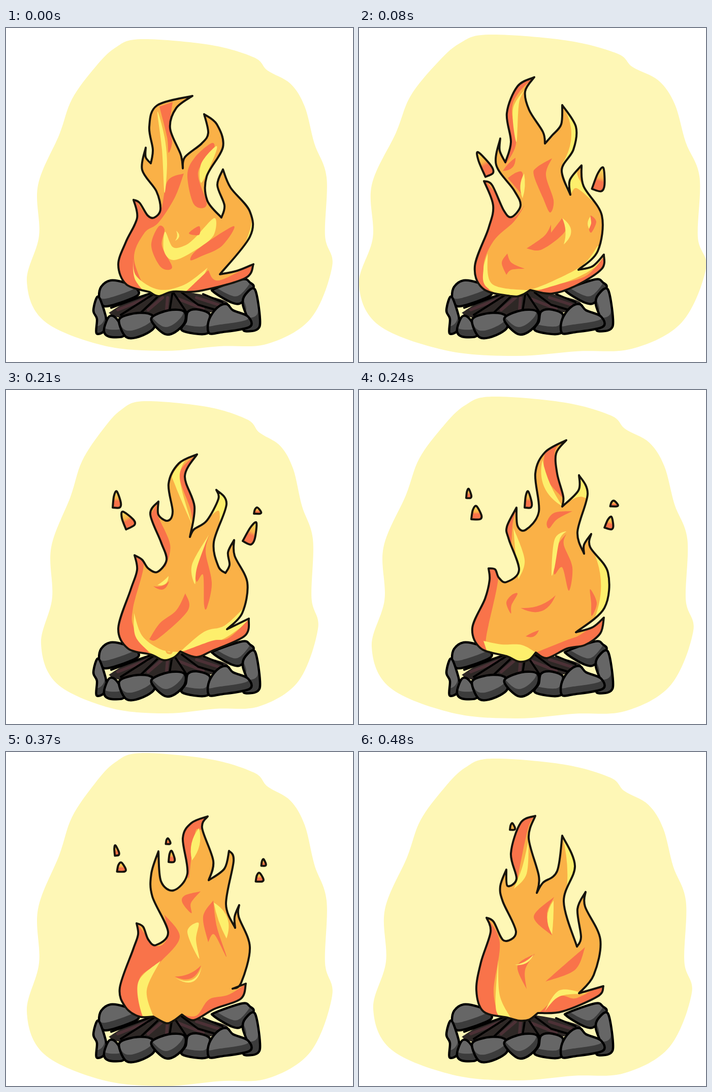
Write an HTML page that moves like this. It is 683 px wide and 659 px high and loops after 0.56 s.

```html
<!DOCTYPE html>
<html lang="en">
<head>
<meta charset="utf-8">
<title>Campfire</title>
<style>
html, body { margin: 0; width: 100%; height: 100%; overflow: hidden; background: #fff; }
svg { display: block; width: 100vw; height: 100vh; }
</style>
</head>
<body>
<svg id="stage" viewBox="0 0 683 659" preserveAspectRatio="none">
  <defs>
    <linearGradient id="ember" x2="0" y2="1">
      <stop offset=".1" stop-color="#fcd95c"/>
      <stop offset=".45" stop-color="#fab147"/>
      <stop offset=".6" stop-color="#f9734a"/>
    </linearGradient>
  </defs>
</svg>
<script>
const STEP = 80;
const INK = '#17140d', RED = '#f9734a', GOLD = '#fab147', YELLOW = '#fdef6c';
const stage = document.getElementById('stage');

function add(parent, tag, attrs = {}) {
  const node = document.createElementNS('http://www.w3.org/2000/svg', tag);
  for (const key in attrs) node.setAttribute(key, attrs[key]);
  parent.appendChild(node);
  return node;
}

// Closed smooth curve through "x,y" points; a star marks a sharp corner.
function curve(text) {
  const pts = text.trim().split(/\s+/).map(s => {
    const [x, y] = s.replace('*', '').split(',').map(Number);
    return { x, y, sharp: s.endsWith('*') };
  });
  const n = pts.length;
  let d = `M${pts[0].x} ${pts[0].y}`;
  for (let i = 0; i < n; i++) {
    const a = pts[i], b = pts[(i + 1) % n];
    const before = a.sharp ? a : pts[(i + n - 1) % n];
    const after = b.sharp ? b : pts[(i + 2) % n];
    d += `C${a.x + (b.x - before.x) / 6} ${a.y + (b.y - before.y) / 6} `
       + `${b.x - (after.x - a.x) / 6} ${b.y - (after.y - a.y) / 6} ${b.x} ${b.y}`;
  }
  return d + 'Z';
}

const path = (parent, d, fill, line = 0, ink = INK) => add(parent, 'path', {
  d, fill, stroke: line ? ink : 'none', 'stroke-width': line,
  'stroke-linejoin': 'round', 'stroke-linecap': 'round'
});

let clips = 0;
function clipTo(parent, d) {
  const id = 'clip' + clips++;
  path(add(stage.querySelector('defs'), 'clipPath', { id }), d, '#000');
  return add(parent, 'g', { 'clip-path': `url(#${id})` });
}

// The lit face is the same outline moved up.
function rock(parent, pts, lift = 15) {
  const d = curve(pts);
  path(parent, d, '#3c3c3c');
  path(clipTo(parent, d), d, '#666').setAttribute('transform', `translate(-4 ${-lift})`);
  path(parent, d, 'none', 4.5, '#000');
}

const glow = path(stage, curve(`265,22 400,33 488,58 515,84 560,110 588,155 607,228 631,295 628,410
  642,470 600,573 515,623 420,628 310,637 190,626 75,578 41,500 65,410 63,310 105,210 130,140 175,78
  215,39`), '#fef7b6');

const back = add(stage, 'g');
path(back, curve('202,562* 258,530 330,518 425,536 428,552 350,572 230,572'), '#2e2826');
path(back, 'M220 556L278 533M280 556L308 532M316 556L318 532M340 535L388 554M375 532L418 546', 'none', 6, '#4c3136');
path(back, 'M207 552L288 522M226 566L292 524M264 563L304 525M328 520L322 558M328 520L356 562M346 522L378 546L412 556M388 525L426 541', 'none', 4, '#000');
rock(back, '187,511 206,498 236,503 257,514 257,529 205,548 188,546 183,532');
rock(back, '412,514 465,496 480,502 487,513 465,541 445,542 409,521');

const flames = add(stage, 'g');
const front = add(stage, 'g');
rock(front, '182,530 198,577 193,598 178,602 179,574 172,557');
rock(front, '471,526 490,516 500,575 494,595 468,597 477,580 466,545', 26);
rock(front, '205,568 217,573 232,598 229,609 203,609 193,599 197,580');
rock(front, '228,570 263,562 289,568 291,592 262,609 237,610 223,584');
rock(front, '358,560 375,555 398,562 403,575 395,603 347,597 354,579');
rock(front, '288,570 320,557 350,559 352,580 333,600 313,604 291,585');
rock(front, '402,570 418,550 435,545 447,557 476,569 479,590 420,601 401,603 397,590');

const poses = [];
let now;
const patch = (fill, pts) => path(now.inside, curve(pts), fill);
const red = pts => patch(RED, pts);
const yellow = pts => patch(YELLOW, pts);

// Crescent between two tips; each side bows by its own amount.
function leaf(fill, x1, y1, x2, y2, bowA, bowB) {
  const len = Math.hypot(x2 - x1, y2 - y1);
  const nx = (y1 - y2) / len, ny = (x2 - x1) / len;
  const ctrl = bow => `${(x1 + x2) / 2 + nx * bow * 2} ${(y1 + y2) / 2 + ny * bow * 2}`;
  path(now.inside, `M${x1} ${y1}Q${ctrl(bowA)} ${x2} ${y2}Q${ctrl(bowB)} ${x1} ${y1}`, fill);
}

function spark(x, y, w, h, tilt = 0, fill = 'url(#ember)') {
  const pts = `0,${-h / 2} ${w / 2},${h / 5} ${w * .35},${h / 2} ${-w / 2},${h / 2}* ${-w * .35},${-h / 5}`;
  path(now.embers, curve(pts), fill, 4).setAttribute('transform', `translate(${x} ${y}) rotate(${tilt})`);
}

// Starts a new pose: glow box, then flame outline.
function flame(x, y, w, h, body) {
  const node = add(flames, 'g', { visibility: 'hidden' });
  const d = curve(body);
  now = { node, x, y, w, h, embers: add(node, 'g') };
  path(node, d, GOLD);
  now.inside = clipTo(node, d);
  path(node, d, 'none', 4);
  poses.push(now);
}

flame(41, 20, 602, 617, `283,521* 237,506 221,467 236,422 258,375 251,339* 263,345 279,370 292,374
  304,358 296,322 268,280 275,236* 275,255 285,267* 289,240 282,195 297,153 367,134* 335,158 323,198
  344,250 348,277* 352,255 385,228 398,207 390,170* 415,190 427,235 395,293 396,340 424,374* 430,350
  416,310 427,279* 442,315 480,362 480,412 421,486* 455,479 487,466* 470,494 380,519 329,520 300,529`);
red('230,330* 252,336 280,372 304,362 318,302 350,287* 332,335 300,384 272,405 252,455 278,525* 200,525*');
yellow('250,455* 257,490 300,516 350,507 397,473* 370,512 300,535 256,500');
red('350,524* 398,478* 420,498 500,458* 480,520*');
red('302,155* 328,146* 322,195 327,225 320,246 317,215');
yellow('298,165 312,215 317,268 312,325 307,240');
red('405,227 408,243 378,285 395,348 370,348 357,290 372,255');
yellow('412,234 412,248 385,305 384,268');
red('300,392 312,398 307,430 327,472 305,472 286,430');
yellow('313,402 328,432 350,430 370,416 410,375 408,410 370,440 330,458 311,440');
patch(GOLD, '345,408 353,402 367,417 346,425');
red('360,405 380,391 380,408');
red('363,458 378,436 448,391 425,430 385,450');
leaf(YELLOW, 427, 279, 470, 425, -34, -70);
leaf(YELLOW, 335, 400, 333, 420, -3, -7);

flame(0, 11, 684, 636, `300,529 245,515 228,470 255,395 264,350 246,302* 262,310 285,360 300,373
  318,350 305,320 270,270 278,218* 277,242 288,265* 299,225 291,168 312,115 345,97* 327,125 335,162
  362,205 366,228* 380,212 398,190 400,152* 427,195 422,240 399,280 416,329* 415,300 438,271* 442,312
  478,370 470,440 432,477* 460,470 482,447* 478,475 430,507 380,524 337,517* 320,527`);
red('225,295* 246,298* 272,330 300,374 326,350* 305,382 265,420 245,470 258,524* 210,520*');
yellow('253,445* 262,505 337,518* 300,534 250,510 245,475');
yellow('340,516* 380,500 440,468 470,430* 490,435* 470,467 430,492 370,514');
red('338,522* 395,505 450,487 490,440* 490,510* 360,535*');
red('347,95* 314,128 301,162 309,228 288,270* 280,180 305,110');
leaf(RED, 308, 256, 283, 282, 2, -9);
yellow('328,120 315,148 310,225 303,160');
leaf(YELLOW, 400, 152, 400, 268, -18, -48);
red('350,275 380,257* 368,290 383,340 376,364 362,335 344,290');
red('293,296* 310,285 322,287 320,328*');
leaf(YELLOW, 325, 287, 322, 336, -3, 6);
yellow('440,268* 430,290 460,342* 428,316 416,332* 405,300');
red('330,435* 365,410 378,388* 378,404* 400,375* 405,402 360,437');
leaf(YELLOW, 400, 375, 403, 427, -16, -5);
leaf(YELLOW, 457, 370, 457, 402, 7, -4);
red('456,370 467,382 458,403 453,398 457,385');
red('292,445* 281,463 290,487* 300,477 326,475* 300,463');
spark(246, 267, 20, 50, -28);
spark(475, 298, 22, 46, 15);

flame(69, 20, 546, 618, `310,533 285,522 240,510 221,470 245,395 258,355 253,326* 268,335 280,352
  298,359 316,335 305,300 284,245 300,220* 300,246 318,258 328,240 320,185 340,145 376,127* 352,170
  371,230 362,290* 370,275 395,258 418,215 414,197* 434,225 409,300 418,348 432,361* 440,345 437,320
  449,296* 450,327 475,380 465,440 435,472* 478,451* 470,485 405,515 375,527 343,516* 330,528`);
red('230,320* 251,322* 271,345 250,430 252,470 285,524* 200,520*');
yellow('252,440* 268,485 305,512 342,517* 315,537 258,492');
patch(GOLD, '314,513 321,517 329,514 325,521 317,520');
yellow('343,516* 390,477 430,465 470,428* 466,448 440,471 500,440* 430,490 375,508');
red('343,518* 405,495 440,488 490,440* 490,520* 350,535*');
red('302,217* 297,242 323,305 314,350* 280,270');
red('379,124* 342,165 363,235 368,270* 380,230 360,175');
yellow('357,131* 329,165 333,188 367,268* 342,175');
yellow('414,194* 445,215* 420,268* 418,238 390,262* 410,235');
red('400,287* 393,320 405,380 396,428 390,425 388,365 375,378 374,345');
yellow('399,286* 366,345 372,383 376,350');
red('353,401* 358,435 300,490 282,492* 303,460 335,435');
leaf(RED, 290, 387, 321, 377, 12, 5);
leaf(YELLOW, 298, 385, 320, 367, 8, 1);
spark(218, 216, 16, 32);
spark(238, 255, 22, 34, -28);
spark(495, 238, 14, 12);
spark(484, 282, 20, 44, 24);

flame(25, 11, 634, 637, `315,536 290,525 240,510 223,470 248,412 257,375 255,352* 268,354 275,370
  290,379 315,355 295,295 291,270 310,232* 312,268 328,276 354,240 347,165 366,123 408,99* 388,125
  390,165 402,210 400,230* 432,198 433,168* 450,205 430,280 443,323* 443,305 457,284* 455,310 490,360
  483,430 427,478* 460,468 482,449* 475,480 445,503 410,510 370,529 348,518* 335,532`);
red('235,340* 255,345* 274,370 250,490 256,524* 205,520*');
yellow('245,495* 280,502 320,503 348,518* 320,542 255,525*');
red('348,518* 405,495 440,480 495,435* 490,520* 365,540*');
red('312,230* 303,260 300,304* 282,270');
yellow('304,272* 326,335 314,374* 308,320');
red('411,96* 385,125 402,214* 367,170 370,115');
leaf(YELLOW, 361, 138, 401, 230, 18, 5);
yellow('432,165* 428,202 396,234* 420,216 440,211 465,225* 455,180*');
red('370,260 385,242 420,239* 390,255 374,273');
red('408,284* 403,305 420,350 413,396 400,350 384,363 390,310');
yellow('408,279 385,295 379,363 385,350 395,295');
red('312,402 300,405 290,420 299,441 300,425');
leaf(RED, 318, 430, 387, 405, 20, 8);
leaf(RED, 328, 486, 354, 474, 7, -1);
leaf(YELLOW, 446, 290, 458, 464, -24, -80);
red('455,393 468,420 458,446 457,420');
spark(216, 204, 10, 18);
spark(231, 242, 20, 26);
spark(333, 216, 14, 32);
spark(502, 224, 15, 11);
spark(494, 262, 16, 24, 15);

flame(41, 0, 602, 659, `315,535 290,522* 262,522 235,503 224,465 250,390 260,360 257,338* 270,345
  280,370 295,381 319,355 288,285 286,240 300,196* 305,255 330,273 357,240 348,170 365,140 397,127*
  386,150 408,215 399,253* 430,230 439,195* 448,215 433,300 451,347* 450,325 459,302* 458,325 480,385
  463,455 446,467* 472,457* 462,487 410,507 370,529 346,518* 330,530`);
red('235,330* 255,334* 295,382 318,365 312,321* 342,365 305,413 262,450 275,524* 200,520*');
yellow('304,412* 277,470 290,522* 270,524 260,455');
red('346,518* 375,520 400,488 440,478 490,445* 490,520* 360,540*');
red('400,124* 385,152 372,160 360,250* 340,205 355,140');
leaf(YELLOW, 380, 150, 366, 214, 8, -8);
red('383,275* 352,283 347,297 365,318 364,298');
red('408,293* 388,325 398,375* 410,360 434,404 415,345');
leaf(YELLOW, 409, 297, 434, 368, 3, -15);
yellow('379,337 357,355 380,408 374,370');
leaf(RED, 332, 443, 384, 421, 16, 6);
leaf(YELLOW, 334, 446, 385, 424, 20, 16);
spark(217, 194, 9, 20, -10);
spark(227, 227, 17, 18);
spark(319, 176, 9, 11);
spark(326, 206, 12, 22);
spark(507, 218, 9, 13);
spark(499, 247, 15, 17);

flame(28, 20, 628, 618, `315,532 285,518* 255,518 226,475 250,390 249,334* 262,342 275,363 292,369
  309,345 287,270 310,223* 302,255 325,281 354,250 345,180 359,125 381,101* 372,125 390,195 388,238*
  410,222 420,177* 434,220 424,295 436,331* 437,305 450,290* 452,322 480,370 470,440 440,469* 471,458*
  450,493 405,512 365,530 345,520* 335,530`);
red('230,325* 247,330* 284,375 264,475 268,524* 200,520*');
yellow('274,430* 300,495 344,520* 320,537 268,500');
red('344,519* 385,495 420,490 490,440* 490,520* 360,540*');
red('384,98* 364,150 365,210 356,250* 330,150*');
leaf(YELLOW, 369, 135, 360, 215, -2, -13);
red('420,173* 413,255 425,292* 450,230*');
leaf(RED, 388, 288, 328, 321, -2, 14);
yellow('387,290* 365,325 330,322* 365,308');
red('353,356* 364,376 340,384* 350,373');
yellow('363,362* 370,384 348,383* 362,380');
red('421,351* 404,380 406,410 418,400* 430,440 437,420');
leaf(YELLOW, 422, 353, 431, 438, -8, -20);
red('365,440* 340,460 318,460* 345,473');
leaf(YELLOW, 440, 300, 485, 395, -14, -50);
yellow('451,286* 460,330 445,337 430,331*');
spark(215, 187, 8, 11, 0, GOLD);
spark(226, 222, 12, 14, 20, GOLD);
spark(315, 164, 12, 11, 0, GOLD);
spark(326, 192, 11, 15, -10, GOLD);
spark(500, 240, 13, 10, 0, GOLD);

flame(28, 11, 628, 637, `315,530 292,524 245,512 231,470 240,415 259,355 251,327* 265,335 285,372
  309,355 283,295 278,265 290,232* 292,264 310,250 299,200 318,140 347,126* 334,170 354,245 350,278*
  362,258 390,235 400,165* 425,225 403,295 429,384* 437,365 430,310 446,276* 445,305 475,370 462,440
  433,476* 481,462* 470,482 400,512 352,515* 335,528`);
red('230,318* 249,323* 277,375 265,470 275,522* 210,520*');
yellow('274,410* 277,480 300,527* 270,510');
red('352,517* 395,482 430,485 495,448* 490,520*');
yellow('365,512* 395,470 448,477* 395,482');
red('350,123* 333,150 312,250* 285,240* 295,140*');
yellow('334,172* 330,240 305,270* 322,225');
leaf(YELLOW, 400, 165, 406, 293, -7, -45);
red('384,286* 370,320 380,362* 344,325');
leaf(YELLOW, 383, 293, 380, 360, 11, -1);
red('346,398* 312,422 330,468* 327,430');
leaf(YELLOW, 344, 399, 307, 420, -8, -4);
red('367,453* 410,415 445,385* 425,430');
spark(302, 147, 10, 13, 0, GOLD);

const base = poses[0];
function draw(time) {
  const p = poses[Math.floor(time / STEP) % poses.length];
  for (const q of poses) q.node.setAttribute('visibility', q === p ? 'visible' : 'hidden');
  glow.setAttribute('transform',
    `translate(${p.x} ${p.y}) scale(${p.w / base.w} ${p.h / base.h}) translate(${-base.x} ${-base.y})`);
}

let start;
function tick(time) {
  start ??= time;
  draw(time - start);
  requestAnimationFrame(tick);
}
draw(0);
requestAnimationFrame(tick);
</script>
</body>
</html>
```
